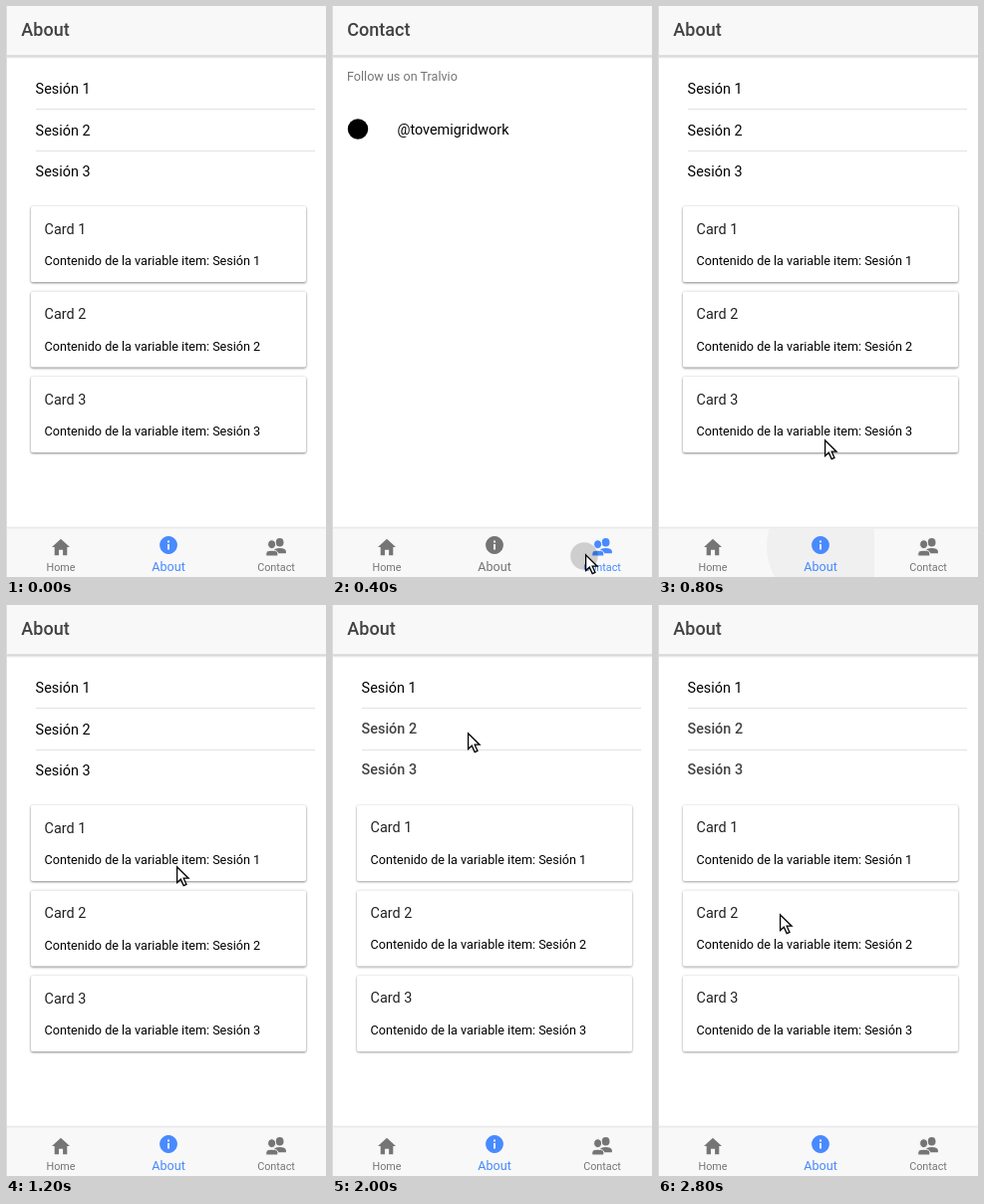
An HTML page that plays this animation: 321 px wide and 573 px high, repeating every 3 s.

```html
<!DOCTYPE html>
<html lang="es">
<head>
<meta charset="utf-8">
<title>Tabs</title>
<style>
  html, body { margin: 0; width: 100%; height: 100%; overflow: hidden; background: #fff; }
  svg { display: block; width: 321px; height: 573px; font-family: Roboto, sans-serif; }
  .title { font-size: 18px; font-weight: 500; fill: #424242; }
  .item, .handle { font-size: 14.4px; }
  .card { fill: #fff; filter: drop-shadow(0 1px .8px rgba(0, 0, 0, .42)) drop-shadow(0 0 1px rgba(0, 0, 0, .13)); }
  .late .card { filter: drop-shadow(0 1.3px 1.1px rgba(0, 0, 0, .32)) drop-shadow(0 0 1px rgba(0, 0, 0, .13)); }
  .card-title { font-size: 14.4px; fill: #222; }
  .content { font-size: 12.6px; }
  .late .item.soft { font-weight: 500; fill: #424242; }
  .hint { font-size: 12.6px; fill: #757575; }
  .tab { fill: #757575; font-size: 10.8px; text-anchor: middle; }
  .tab.selected { fill: #488aff; }
  .tab.large { font-size: 12.6px; }
  .tab.large .icon { transform: translateY(-1.7px); }
</style>
</head>
<body>
<svg viewBox="0 0 321 573">
  <defs>
    <linearGradient id="headerShade" x2="0" y2="1">
      <stop stop-color="#c9c9c9"/><stop offset="1" stop-color="#fff"/>
    </linearGradient>
    <linearGradient id="footerShade" x2="0" y2="1">
      <stop stop-color="#fff"/><stop offset="1" stop-color="#dcdcdc"/>
    </linearGradient>
    <clipPath id="aboutTab"><rect x="109" y="524.5" width="108" height="49"/></clipPath>
  </defs>
  <rect width="321" height="573" fill="#fff"/>

  <g id="about"></g>
  <g id="contact">
    <text class="hint" x="15" y="75">Follow us on Tralvio</text>
    <circle cx="26" cy="123.5" r="10.2"/>
    <text class="handle" x="65.5" y="129">@tovemigridwork</text>
  </g>

  <rect width="321" height="50" fill="#f8f8f8"/>
  <rect y="49.5" width="321" height="3.5" fill="url(#headerShade)"/>
  <text class="title" id="title" x="15.3" y="30"></text>

  <rect y="522" width="321" height="2.5" fill="url(#footerShade)"/>
  <rect y="524.5" width="321" height="49" fill="#f8f8f8"/>
  <g clip-path="url(#aboutTab)"><circle id="wave" cx="171" cy="542" r="62" fill="#f0f0f0"/></g>

  <g class="tab">
    <path class="icon" d="M53 551.2V545.7h4.1v5.5h4.2V543h2.7l-9-8.3-9 8.3h2.7v8.2z"/>
    <text x="55" y="567">Home</text>
  </g>
  <g class="tab">
    <path class="icon" fill-rule="evenodd" d="M163 533.8a8.9 8.9 0 1 0 .01 0zM162 541.8h2v5.3h-2zM162 538.1h2v2h-2z"/>
    <text x="163" y="567">About</text>
  </g>
  <g class="tab">
    <g class="icon">
      <ellipse cx="274.6" cy="538.3" rx="3.9" ry="4.3"/>
      <path d="M269 549.2v-2.4q0-2.8 5.6-2.8t6.3 3v2.2z"/>
      <g stroke="#f8f8f8" stroke-width="1">
        <ellipse cx="266.6" cy="540.2" rx="4" ry="4.4"/>
        <path d="M260.8 552v-2.6q0-3.2 6-3.2t6 3.2v2.6z"/>
      </g>
    </g>
    <text x="271" y="567">Contact</text>
  </g>

  <rect width="1" height="573" fill="#dcdcdc"/>
  <circle id="press" r="13.8" fill="#000" fill-opacity=".17"/>
  <path id="cursor" d="M.6.9V16.6L4.3 13.2 7.2 19.6 10 18.4 7.2 12.2H12.1z"
        fill="#fff" stroke="#000" stroke-width="1.3"/>
</svg>
<script>
const STEP = 200;

// One entry per step: cursor tip, then only the settings that differ from DEFAULTS.
const DEFAULTS = { page: 1, large: 1, press: null, wave: 0, late: false };
const STEPS = [
  { at: null },
  { at: [254, 550], press: [253, 552] },
  { at: [254, 550], press: [253, 552], page: 2 },
  { at: [168, 542], page: 2, large: 2 },
  { at: [167, 435], wave: 1 },
  { at: [134, 231], wave: .3 },
  { at: [171, 262] },
  { at: [153, 272] },
  { at: [134, 167] },
  { at: [132, 150] },
  { at: [136, 128], late: true },
  { at: [140, 109], late: true },
  { at: [138, 95], late: true },
  { at: [97, 148], late: true },
  { at: [122, 310], late: true }
].map(step => ({ ...DEFAULTS, ...step }));

// Text baselines before and after the page settles.
const ROWS = [
  { item: [88, 88], title: [229, 228], content: [260, 260] },
  { item: [130, 129], title: [314, 314], content: [346, 345] },
  { item: [171, 170], title: [400, 399], content: [431, 431] }
];

const find = id => document.getElementById(id);
const about = find('about');
const tabs = [...document.querySelectorAll('.tab')];

const label = (cls, x, [early, late], text) =>
  `<text class="${cls}" x="${x}" y="${early}" data-early="${early}" data-late="${late}">${text}</text>`;

about.innerHTML = ROWS.map((row, i) => {
  const n = i + 1;
  const line = i < 2 ? `<rect x="30" y="${103 + 42 * i}" width="280" height="1" fill="#e2e2e2"/>` : '';
  return label(i ? 'item soft' : 'item', 29.6, row.item, `Sesión ${n}`) + line +
    `<rect class="card" x="25" y="${201 + 85.5 * i}" width="276" height="76" rx="1.8"/>` +
    label('card-title', 38.6, row.title, `Card ${n}`) +
    label('content', 38.6, row.content, `Contenido de la variable item: Sesión ${n}`);
}).join('');
const labels = [...about.querySelectorAll('text')];

function place(node, point) {
  node.style.display = point ? '' : 'none';
  if (point) node.setAttribute('transform', `translate(${point})`);
}

function show({ at, page, large, press, wave, late }) {
  about.style.display = page === 1 ? '' : 'none';
  find('contact').style.display = page === 2 ? '' : 'none';
  find('title').textContent = page === 1 ? 'About' : 'Contact';
  about.classList.toggle('late', late);
  labels.forEach(t => t.setAttribute('y', late ? t.dataset.late : t.dataset.early));
  tabs.forEach((tab, i) => {
    tab.classList.toggle('selected', i === page);
    tab.classList.toggle('large', i === large);
  });
  find('wave').style.opacity = wave;
  place(find('press'), press);
  place(find('cursor'), at);
}

let current = -1;
function tick() {
  const index = Math.floor(performance.now() / STEP) % STEPS.length;
  if (index !== current) show(STEPS[current = index]);
  requestAnimationFrame(tick);
}
tick();
</script>
</body>
</html>
```
